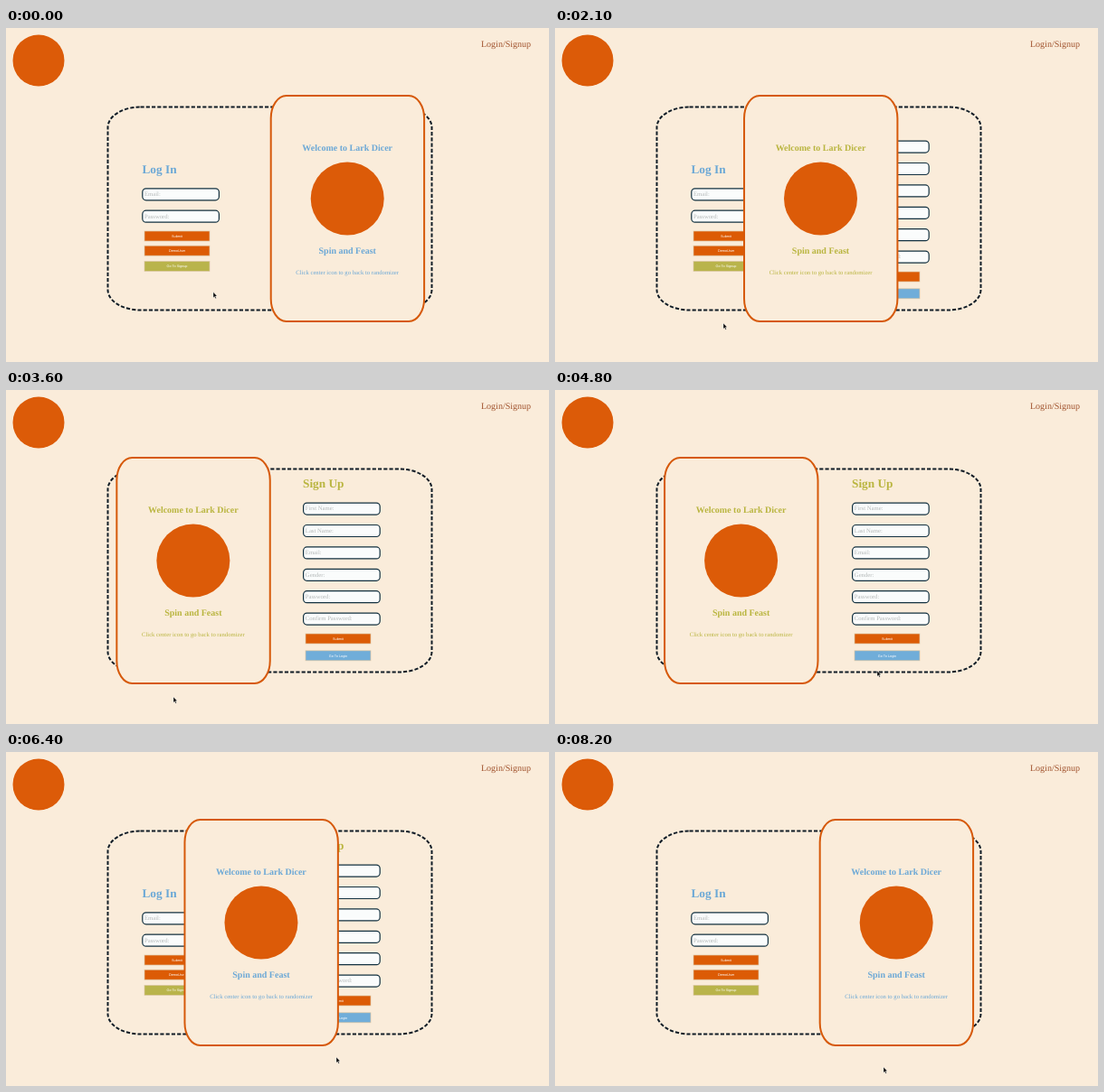
An HTML page that plays this animation: 600 px wide and 370 px high, repeating every 8.3 s.

```html
<!DOCTYPE html>
<html lang="en">
<head>
<meta charset="utf-8">
<title>Login and signup panel</title>
<style>
  html, body { margin: 0; width: 100%; height: 100%; overflow: hidden; background: #faecda; }
  svg { display: block; width: 600px; height: 370px; }
  text { font-family: "Liberation Serif", Times, serif; text-rendering: geometricPrecision; }
  .title { font-weight: bold; font-size: 13.3px; }
  .field rect { fill: #fafcfc; stroke: #12303f; stroke-width: 1.2; }
  .field text { font-size: 6.7px; fill: #b4b8b8; }
  .button rect { stroke: #dcc7a4; stroke-width: .7; }
  .button text { font: 3.8px "Liberation Sans", Arial, sans-serif; fill: #fff; text-anchor: middle; }
  #panel text { text-anchor: middle; font-size: 10px; font-weight: bold; }
  #panel .hint { font-size: 6.67px; font-weight: normal; }
</style>
</head>
<body>
<svg viewBox="0 0 600 370">
  <rect width="600" height="370" fill="#faecda"/>
  <circle cx="36" cy="36" r="28.5" fill="#dc5b08"/>
  <text x="525" y="20.5" font-size="10" fill="#a0522d">Login/Signup</text>
  <rect x="112.5" y="87.5" width="358" height="225" rx="36" ry="22.6"
        fill="none" stroke="#101c26" stroke-width="2" stroke-dasharray="4.17 2.08"/>
  <text class="title" x="150.5" y="161" fill="#6ba8d6">Log In</text>
  <text class="title" x="328" y="108.4" fill="#b9b53f">Sign Up</text>
  <g id="forms"></g>
  <g id="panel">
    <rect x="292.7" y="75" width="169.4" height="250" rx="17" ry="25"
          fill="#faecda" stroke="#d6590a" stroke-width="2"/>
    <circle cx="377.2" cy="189" r="40.5" fill="#dc5b08"/>
    <text x="377.2" y="136">Welcome to Lark Dicer</text>
    <text x="377.2" y="249.5">Spin and Feast</text>
    <text class="hint" x="377.2" y="273">Click center icon to go back to randomizer</text>
  </g>
  <path id="cursor" d="M0 0V6.2L1.4 5L2.4 7.2L3.4 6.7L2.4 4.6H4.2Z"
        fill="#000" stroke="#fff" stroke-width=".4"/>
</svg>
<script>
const ORANGE = '#dc5b05', BLUE = '#70add9', OLIVE = '#b9b44b';
const LOOP = 8300, STEP = 100, SLIDE = 2500, SHIFT = 171.6;
const TO_SIGNUP = 1382, TO_LOGIN = 5733;
const $ = id => document.getElementById(id);

const field = (x, y, label) => `<g class="field">
  <rect x="${x}" y="${y}" width="84.6" height="13" rx="4"/>
  <text x="${x + 2.2}" y="${y + 8.3}">${label}</text></g>`;
const button = (x, y, fill, label) => `<g class="button">
  <rect x="${x}" y="${y}" width="72" height="11" fill="${fill}"/>
  <text x="${x + 36}" y="${y + 6.9}">${label}</text></g>`;

const loginFields = ['Email:', 'Password:'];
const signupFields = ['First Name:', 'Last Name:', 'Email:', 'Gender:', 'Password:', 'Confirm Password:'];
$('forms').innerHTML = [
  ...loginFields.map((label, i) => field(150.8, 177.8 + i * 24.4, label)),
  ...signupFields.map((label, i) => field(328.6, 125.1 + i * 24.4, label)),
  button(153, 225, ORANGE, 'Submit'),
  button(153, 241.2, ORANGE, 'DemoUser'),
  button(153, 258.4, OLIVE, 'Go To Signup'),
  button(331, 270, ORANGE, 'Submit'),
  button(331, 288.8, BLUE, 'Go To Login'),
].join('');

// cubic-bezier(.25, .1, .25, 1)
function ease(x) {
  if (x <= 0) return 0;
  if (x >= 1) return 1;
  let lo = 0, hi = 1, s;
  for (let i = 0; i < 24; i++) {
    s = (lo + hi) / 2;
    if (.75 * s * (1 - s) + s ** 3 < x) lo = s; else hi = s;
  }
  return .3 * (1 - s) ** 2 * s + 3 * (1 - s) * s * s + s ** 3;
}

// time, x, y of the pointer tip
const path = [
  [100, 229, 292.5], [900, 192, 264], [1400, 190, 264], [1900, 187, 320],
  [2100, 186, 327], [2600, 185, 340], [3800, 185, 340], [4800, 356, 311],
  [5200, 367, 294], [5800, 367, 294], [6400, 365, 338], [6600, 363, 349], [LOOP, 363, 349],
];
function pointer(t) {
  if (t <= path[0][0]) return path[0].slice(1);
  const i = path.findIndex(p => p[0] >= t);
  const [t0, x0, y0] = path[i - 1], [t1, x1, y1] = path[i];
  const k = (t - t0) / (t1 - t0), e = k * k * (3 - 2 * k);
  return [x0 + (x1 - x0) * e, y0 + (y1 - y0) * e];
}

function draw(now) {
  const t = Math.floor(now % LOOP / STEP) * STEP;
  const moved = ease((t - TO_SIGNUP) / SLIDE) - ease((t - TO_LOGIN) / SLIDE);
  const signup = t >= TO_SIGNUP && t < TO_LOGIN;
  $('panel').setAttribute('transform', `translate(${-SHIFT * moved})`);
  $('panel').setAttribute('fill', signup ? '#b9b53f' : '#6ba8d6');
  $('cursor').setAttribute('transform', `translate(${pointer(t)})`);
}

const start = performance.now();
function tick() {
  draw(performance.now() - start);
  requestAnimationFrame(tick);
}
tick();
</script>
</body>
</html>
```
